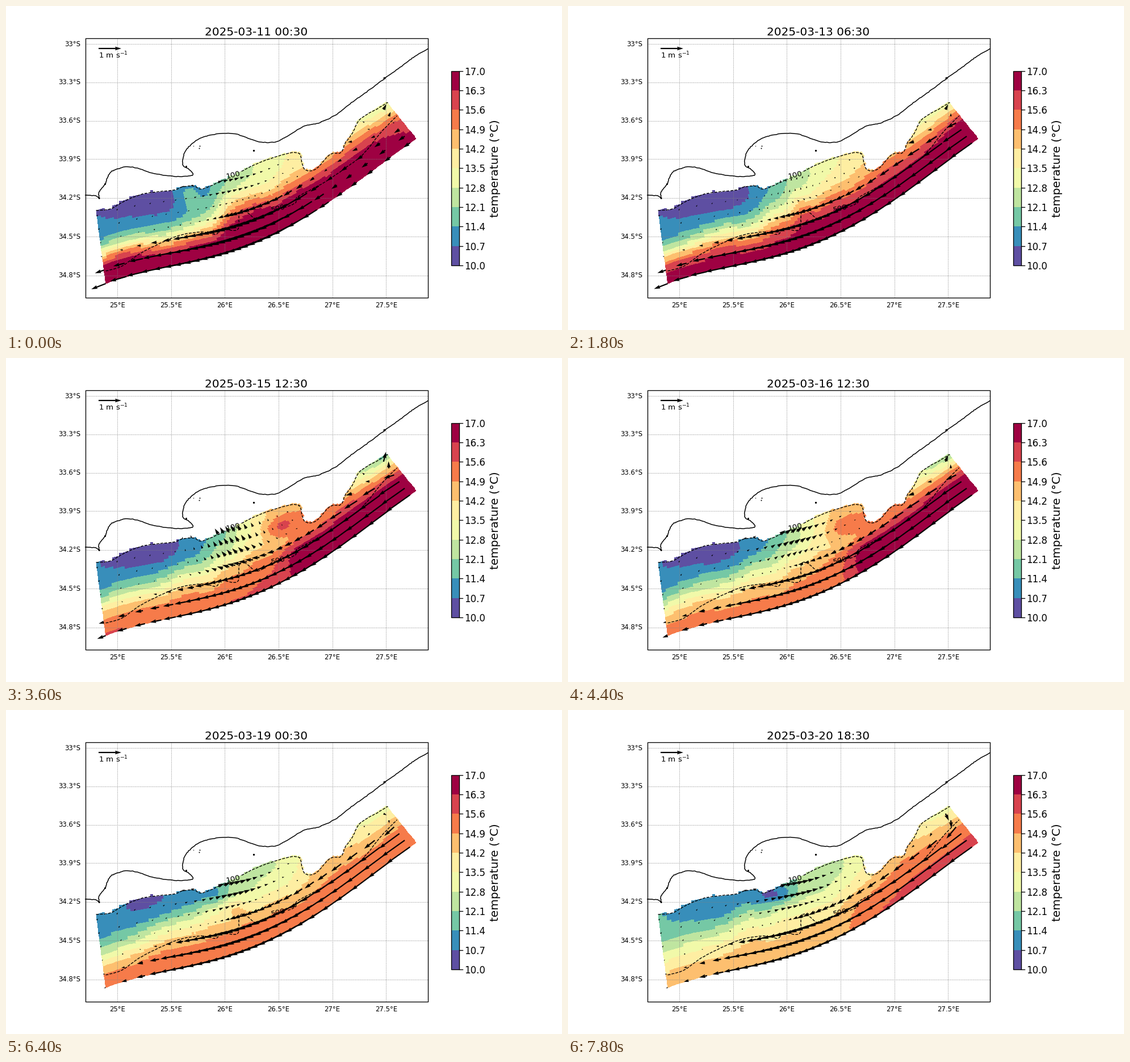
Write a matplotlib script that moves like this. It is 979 px wide and 572 px high and loops after 8 s.

```python
import numpy as np
import matplotlib.pyplot as plt
from matplotlib.animation import FuncAnimation
from matplotlib.patches import Rectangle

W, H, DPI = 979, 572, 120
FRAMES, STEP = 40, 200
rng = np.random.default_rng(4)

shelf = [(159, 361), (185, 358), (210, 344), (245, 331), (295, 325), (312, 319),
         (332, 318), (342, 323), (360, 318), (415, 292), (443, 278), (490, 262),
         (516, 260), (522, 279), (529, 290), (546, 288), (571, 262), (590, 259),
         (598, 242), (610, 225), (624, 200), (655, 181), (673, 170)]
slope = [(176, 468), (205, 459), (240, 435), (300, 407), (345, 399), (370, 403),
         (380, 393), (408, 395), (411, 366), (420, 361), (442, 376), (464, 366),
         (508, 349), (514, 337), (560, 312), (605, 281), (630, 261), (662, 222),
         (689, 194)]
coast = [(140, 334), (158, 335), (165, 340), (164, 330), (175, 314), (182, 297),
         (193, 289), (220, 284), (262, 296), (300, 301), (328, 299), (325, 290),
         (312, 280), (316, 257), (335, 238), (360, 228), (400, 225), (443, 239),
         (474, 240), (495, 230), (526, 212), (550, 207), (580, 193), (606, 173),
         (635, 152), (667, 128), (700, 104), (722, 88), (743, 76)]


def curve(points, amp=0.0, n=10):
    """Catmull-Rom line through the points, slightly roughened."""
    p = np.array([points[0], *points, points[-1]], float)
    t = np.linspace(0, 1, n, endpoint=False)[:, None]
    parts = [b + t * (c - a) / 2 + t**2 * (a - 2.5 * b + 2 * c - d / 2)
             + t**3 * (3 * (b - c) + d - a) / 2
             for a, b, c, d in zip(p, p[1:], p[2:], p[3:])]
    line = np.vstack([*parts, p[-1:]])
    return line + rng.uniform(-amp, amp, line.shape)


def key(i, *points):
    return np.interp(i, *zip(*points))


def logistic(x):
    return 1 / (1 + np.exp(-x))


def bump(x, centre, width):
    return np.exp(-((x - centre) / width)**2)


# Curvilinear grid: column k runs along the shore, row r from sea to shore
fit = np.polynomial.Polynomial.fit
col_x = fit([0, 6, 12, 18, 23, 27.3], [176, 342, 423, 498, 591, 723], 4)
edge_y = fit([176, 290, 385, 480, 575, 640, 723],
             [490, 460, 434, 400, 341, 295, 234], 4)


def grid(cols, rows):
    k, r = np.meshgrid(cols, rows, indexing="ij")
    tilt = np.radians(7.5 + 0.9 * k + 0.009 * k**2)
    d = r * (24 - k / 3)
    x = col_x(k)
    return x - d * np.sin(tilt), edge_y(x) - d * np.cos(tilt)


shore_x, shore_y = curve(shelf).T
shore_x = np.maximum.accumulate(shore_x)


def inland(x, y):
    return y < np.interp(x, shore_x, shore_y) - 1


kc, rc = np.linspace(0, 27.3, 138), np.arange(0, 7.7, 0.2)
km, rm = (kc[1:] + kc[:-1]) / 2, (rc[1:] + rc[:-1]) / 2
land = inland(*grid(km, rm))
K, R = np.meshgrid(km, rm, indexing="ij")

vx, vy = grid(np.arange(28), np.arange(8))
wet = ~inland(vx, vy)
vk, vr = (a[wet] for a in np.meshgrid(np.arange(28), np.arange(8), indexing="ij"))
vx, vy = vx[wet], vy[wet]
heading = np.arctan(-edge_y.deriv()(col_x(vk)))

# Eddies: column, row, their radii, strength, middle and half-life in frames
eddies = [(3.5, 5.0, 3, 1.2, -0.5, 16, 40),
          (6.5, 5.2, 1.3, 1.2, 1.0, 0, 4),
          (13, 4.2, 3, 1.2, 0.6, 0, 6),
          (20, 5.2, 2.2, 0.9, 1.0, 18, 7),
          (20, 3.4, 2.5, 0.7, -0.9, 20, 6),
          (10, 5.3, 3, 0.9, -1.4, 39, 9),
          (12, 4.0, 2, 0.8, 0.8, 33, 5)]


def temperature(i):
    """Warm current and cold shelf water joined by a sloping front."""
    age = i / (FRAMES - 1)
    west = key(i, (0, 17.5), (7, 17.5), (12, 16.3), (22, 15.4), (32, 15.7), (39, 14.8))
    east = key(i, (0, 16.1), (12, 17.5), (24, 17.4), (32, 15.5), (39, 15.9))
    middle = key(i, (0, 13.2), (5, 12.9), (20, 14.6), (32, 12.6), (39, 12.3))
    corner = key(i, (0, 12.2), (12, 11.8), (20, 10.3), (32, 12.3))
    border = key(i, (0, 26), (12, 23.5), (18, 19))
    warm = west + (east - west) * logistic((K - border) / 0.9)
    cold = key(K, (0, key(i, (30, 10.8), (39, 11.5))), (4, 10.7), (7, 10.7),
               (12, 11.7), (20, middle), (24, 14), (27, corner))
    front = key(K, (0, 2.1), (6, 2.1 + 1.7 * age), (13, 3.6), (24, 3.2), (27, 4.3))
    front = front + 0.12 * np.sin(1.3 * K - 0.3 * i)
    width = key(K, (0, 0.5), (8, 0.8)) * (1 + 0.5 * age)
    t = cold + (warm - cold) * logistic((front - R) / width)
    for k, r, rk, rr, amp, mid, life in eddies:
        t = t + amp * bump(K, k, rk) * bump(R, r, rr) * bump(i, mid, life)
    return np.ma.array(t, mask=land)


def current(i):
    """Coastal jet with a weaker shelf flow inshore of it, in pixels."""
    west = key(i, (0, 30), (12, 28), (22, 11), (32, 4))
    middle = key(i, (0, 46), (12, 36), (18, 25), (32, 41), (39, 37))
    east = key(i, (0, 14), (5, 40), (12, 52), (39, 50))
    speed = key(vk, (0, west), (6, middle), (19, middle), (23, 0.85 * east), (27, east))
    jet = logistic((key(vk, (0, 1.2), (13, 3)) - vr) / 0.5)

    drift = key(i, (0, 6), (5, 6), (12, -7), (18, -9), (22, 8), (39, 11))
    rise = key(i, (0, 3), (12, 5), (18, 11), (24, 6), (39, 4))
    swing = key(i, (0, 10), (12, 10), (18, 18), (24, 9), (39, -12))
    retreat = key(i, (22, -9), (32, -2))
    centre, cape, corner = bump(vk, 13, 6), bump(vk, 25, 1.6), bump(vk, 27, 0.8)
    u = 2 + drift * centre + retreat * cape + 5 * corner
    v = 3 * bump(vk, 0, 5) + rise * centre + swing * corner
    return (-speed * jet * np.cos(heading) + u * (1 - jet),
            speed * jet * np.sin(heading) - v * (1 - jet))


fig = plt.figure(figsize=((W + 0.001) / DPI, (H + 0.001) / DPI), dpi=DPI,
                 facecolor="white")
ax = fig.add_axes([0, 0, 1, 1])
ax.axis("off")
cmap = plt.get_cmap("Spectral_r", 10)

mesh = ax.pcolormesh(*grid(kc, rc), temperature(0), cmap=cmap,
                     vmin=10, vmax=17, zorder=1)

# Graticule
dots = dict(color="gray", lw=0.6, ls=":", zorder=2)
for i in range(6):
    x = 196.3 + 94.7 * i
    ax.plot([x, x], [57, 515], **dots)
    ax.text(x, 532, f"{25 + i / 2:g}°E", size=7, ha="center")
for i in range(7):
    y = 67.5 + 67.3 * i + 0.12 * i**2
    ax.plot([140, 743], [y, y], **dots)
    ax.text(131.5, y, f"{33 + 0.3 * i:g}°S", size=7, ha="right", va="center")

# Coast, islets and depth contours
ax.plot(*curve(coast, 0.5).T, "k", lw=0.9, zorder=3)
for x, y, size in [(341, 247, 1.2), (340, 251, 1.2), (330, 247, 0.8),
                   (436.5, 255, 2), (317, 283, 1.8), (174, 314, 1.8),
                   (666, 127.5, 2.4)]:
    ax.plot(x, y, "ko", ms=size, mew=0, zorder=3)
for points, depth, x, y in [(shelf, 100, 401, 299), (slope, 500, 480, 358)]:
    line = curve(points, 0.3)
    line[abs(line[:, 0] - x) < 13] = np.nan
    ax.plot(*line.T, "k--", lw=0.8, zorder=3)
    ax.text(x, y, str(depth), size=8, rotation=14, ha="center", va="center", zorder=3)

# Currents and key
arrow = dict(angles="xy", scale_units="xy", scale=1, units="x", width=2.2,
             color="black")
quiver = ax.quiver(vx, vy, *current(0), zorder=4, **arrow)
ax.quiver([163.5], [75], [40], [0], zorder=4, **arrow)
ax.text(189.5, 92.5, "1 m s$^{-1}$", size=8, ha="center")
ax.add_patch(Rectangle((140, 57.5), 603, 457.5, fill=False, lw=0.8, zorder=5))
title = ax.text(441, 52, "", size=12, ha="center")

# Colour bar
unit = 34.33
for i in range(11):
    y = 458 - unit * i
    if i < 10:
        ax.add_patch(Rectangle((784, y - unit), 14.5, unit, fc=cmap(i), lw=0))
    ax.plot([798.5, 804], [y, y], "k", lw=0.8)
    ax.text(808, y, f"{10 + 0.7 * i:.1f}", size=10, va="center_baseline")
ax.add_patch(Rectangle((784, 458 - 10 * unit), 14.5, 10 * unit, fill=False, lw=0.8))
ax.text(861.5, 286.5, "temperature (°C)", size=12, rotation=90,
        ha="center", va="center")

ax.set_xlim(0.5, W + 0.5)
ax.set_ylim(H, 0)


def update(i):
    mesh.set_array(temperature(i))
    quiver.set_UVC(*current(i))
    title.set_text(f"2025-03-{11 + i // 4} {i % 4 * 6:02d}:30")
    return mesh, quiver, title


update(0)
anim = FuncAnimation(fig, update, frames=FRAMES, interval=STEP, repeat=True)
plt.show()
```
